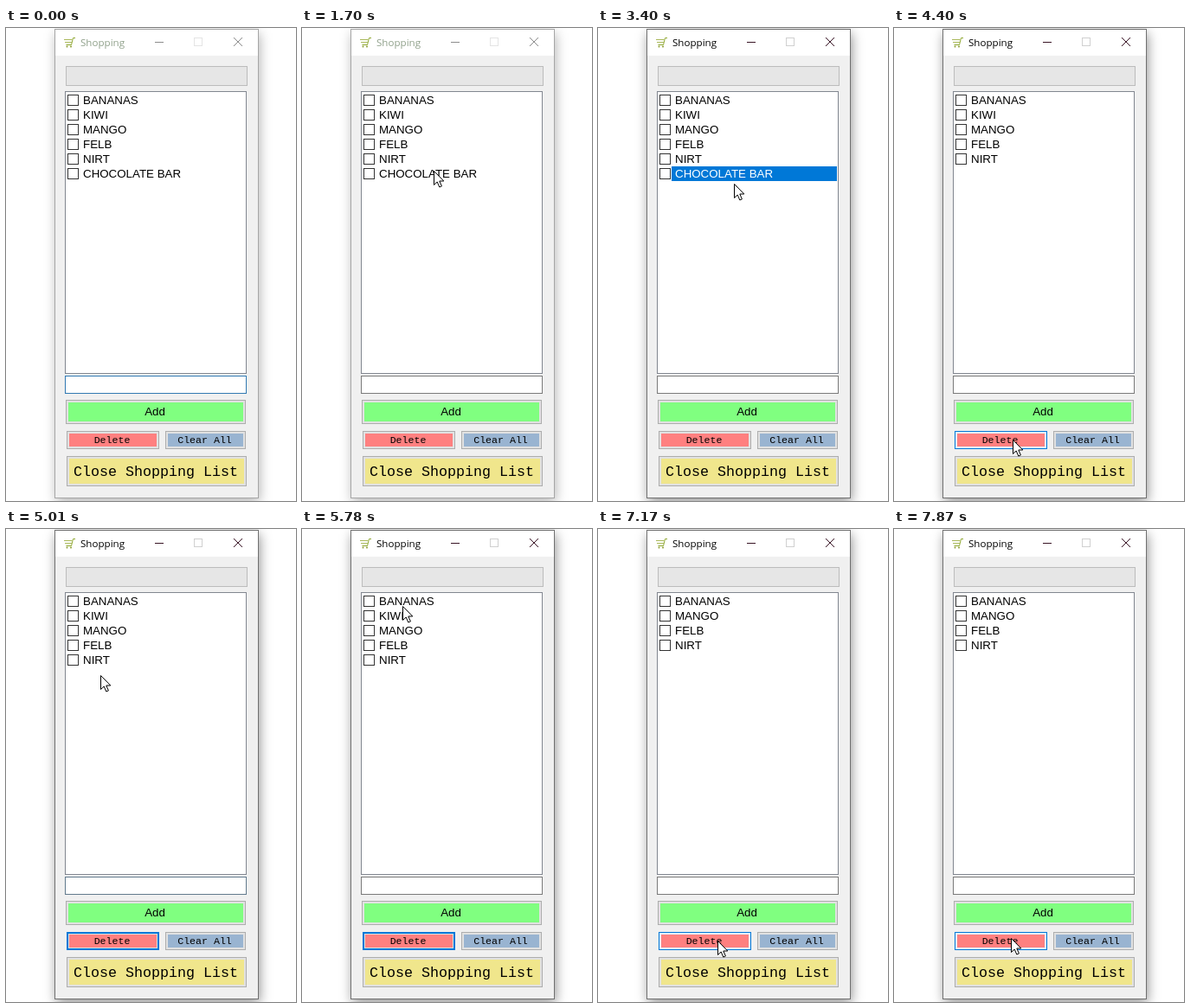
These frames come from a looping animation (335 px wide and 547 px high, 8 s). An HTML page:

```html
<!DOCTYPE html>
<html lang="en">
<head>
<meta charset="utf-8">
<title>Shopping</title>
<style>
  html, body { margin: 0; width: 100%; height: 100%; overflow: hidden; background: #fff; }
  svg { display: block; width: 100vw; height: 100vh; }
  text { white-space: pre; }
  .list { font: 13.33px "Liberation Sans", Arial, sans-serif; }
  .mono { font-family: "Liberation Mono", "Courier New", monospace; }
  .title { font: 11.6px "Open Sans", "Noto Sans", sans-serif; }
</style>
</head>
<body>
<svg id="stage" viewBox="0 0 335 547">
  <defs>
    <filter id="blur" x="-20%" y="-10%" width="140%" height="120%">
      <feGaussianBlur stdDeviation="7"/>
    </filter>
  </defs>
</svg>
<script>
const LOOP = 8000, STEP = 77.1, FADE = 5;
const BLUE = [0, 120, 215], GREY = [122, 122, 122];
const ITEMS = ["BANANAS", "KIWI", "MANGO", "FELB", "NIRT", "CHOCOLATE BAR"];

// Steps at which the user does something
const ACTIVATE = 42;
const REMOVALS = [
  { item: 5, select: 42, press: 55, gone: 56 },
  { item: 1, select: 82, press: 92, gone: 93 }
];

// Pointer moves, each easing out towards its end point
const START = { x: 148, y: 600 };
const MOVES = [
  { from: 10, to: 15, x: 152, y: 205 },  // in from below
  { from: 16, to: 18, x: 152, y: 159 },
  { from: 19, to: 22, x: 152, y: 165 },
  { from: 30, to: 36, x: 148, y: 404 },  // to the input and back
  { from: 36, to: 41, x: 153, y: 168 },
  { from: 42, to: 44, x: 157, y: 180 },
  { from: 44, to: 51, x: 137, y: 476 },  // to Delete
  { from: 59, to: 69, x: 104, y: 111 },  // up to the list
  { from: 70, to: 75, x: 116, y: 89 },
  { from: 81, to: 82, x: 118, y: 96 },
  { from: 83, to: 86, x: 119, y: 368 },  // to Delete again
  { from: 86, to: 90, x: 138, y: 476 },
  { from: 95, to: 98, x: 152, y: 480 },
  { from: 98, to: 100, x: 122, y: 469 },
  { from: 100, to: 102, x: 135, y: 473 }
];

const stage = document.getElementById("stage");

function set(el, attrs) {
  for (const key in attrs) el.setAttribute(key, attrs[key]);
}

function add(tag, attrs, content) {
  const el = document.createElementNS("http://www.w3.org/2000/svg", tag);
  set(el, attrs);
  if (content) el.textContent = content;
  return stage.appendChild(el);
}

function fillRect(x, y, width, height, fill) {
  return add("rect", { x, y, width, height, fill });
}

// One-pixel border drawn inside the given box
function frame(x, y, w, h, fill, stroke) {
  return add("rect", { x: x + .5, y: y + .5, width: w - 1, height: h - 1, fill, stroke });
}

function line(d, stroke) {
  return add("path", { d, stroke, fill: "none" });
}

function show(el, on) {
  set(el, { visibility: on ? "visible" : "hidden" });
}

function button(x, y, w, h, fill, label, size, cls) {
  const edge = frame(x, y, w, h, "#e1e1e1", "#adadad");
  const ring = add("rect", {
    x: x + 1, y: y + 1, width: w - 2, height: h - 2,
    fill: "none", stroke: "#0078d7", "stroke-width": 2
  });
  fillRect(x + 3, y + 3, w - 6, h - 6, fill);
  add("text", {
    x: x + w / 2 - 1, y: Math.round(y + h / 2 + size * .32), class: cls,
    "font-size": size, "text-anchor": "middle"
  }, label);
  return { x, y, w, h, edge, ring };
}

// Window
const shadow = add("rect", { x: 58, y: 6, width: 235, height: 542, filter: "url(#blur)" });
const border = frame(56, 1, 236, 543, "#f0f0f0", "#777");
fillRect(57, 2, 234, 30, "#fff");

// Cart icon
line("M80 11.5H77.5L75.5 19.5H69.5", "#8fa832");
line("M67 13.5H76.5M68 16.5H76", "#a9b85a");
for (const cx of [70.5, 75]) add("circle", { cx, cy: 21.5, r: 1, fill: "#8a9a2c" });

const title = add("text", { x: 86, y: 21, class: "title" }, "Shopping");
const minimise = line("M172 16.5H182");
const maximise = frame(217, 11, 10, 10, "none");
const cross = line("M263 11L273 21M273 11L263 21");

// Fields
frame(69, 44, 210, 23, "#e6e6e6", "#bcbcbc");
frame(68, 73, 210, 327, "#fff", "#828790");
const rows = ITEMS.map((_, i) => {
  const y = 75 + 17 * i;
  const bar = fillRect(85, y, 191, 17, "#0078d7");
  const box = frame(71, y + 2, 13, 13, "#fff", "#333");
  const label = add("text", { x: 89, y: y + 13, class: "list" });
  return { bar, box, label };
});
const input = frame(68, 402, 210, 21, "#fff");

const addBtn = button(69, 430, 208, 28, "#80ff80", "Add", 13.33, "list");
const delBtn = button(70, 466, 107, 21, "#ff8080", "Delete", 11.6, "mono");
const clearBtn = button(184, 466, 93, 21, "#99b4d1", "Clear All", 11.6, "mono");
const closeBtn = button(70, 495, 208, 35, "#f0e68c", "Close Shopping List", 16.67, "mono");
const buttons = [addBtn, delBtn, clearBtn, closeBtn];

const pointer = add("path", {
  d: "M.5 .5V16.5L4.2 13L6.8 19L9.4 17.9L6.8 12H11.8Z",
  fill: "#fff", stroke: "#000", "stroke-linejoin": "round"
});

function pointerAt(step) {
  let { x, y } = START;
  for (const m of MOVES) {
    if (step <= m.from) break;
    const t = Math.min(1, (step - m.from) / (m.to - m.from));
    const k = 1 - (1 - t) ** 2;
    x += (m.x - x) * k;
    y += (m.y - y) * k;
  }
  return { x: Math.round(x), y: Math.round(y) };
}

function crossesInput(step) {
  const a = pointerAt(step - 1).y, b = pointerAt(step).y;
  return Math.min(a, b) < 423 && Math.max(a, b) >= 402;
}

// The input's highlight fades for a few steps after the pointer leaves it
function inputGlow(step) {
  if (step === 0) return .6;
  for (let k = 0; k < FADE; k++) if (crossesInput(step - k)) return 1 - k / FADE;
  return 0;
}

function inside(p, b) {
  return p.x >= b.x && p.x < b.x + b.w && p.y >= b.y && p.y < b.y + b.h;
}

function drawWindow(active) {
  set(shadow, { "fill-opacity": active ? .44 : .3 });
  set(border, { stroke: active ? "#707070" : "#a6a6a6" });
  set(title, { fill: active ? "#000" : "#8fa08a" });
  set(minimise, { stroke: active ? "#3a1626" : "#8c8c8c" });
  set(maximise, { stroke: active ? "#d0d0d0" : "#e4e4e4" });
  set(cross, { stroke: active ? "#3a1626" : "#8c8c8c" });
}

function drawList(step) {
  const gone = REMOVALS.filter(r => step >= r.gone).map(r => r.item);
  const shown = ITEMS.filter((_, i) => !gone.includes(i));
  const current = REMOVALS.find(r => step >= r.select && step < r.gone);
  rows.forEach((row, i) => {
    const on = Boolean(current) && current.item === i;
    show(row.bar, on);
    show(row.box, i < shown.length);
    set(row.label, { fill: on ? "#fff" : "#000" });
    row.label.textContent = shown[i] || "";
  });
}

function drawControls(step, p) {
  const glow = inputGlow(step);
  const mix = GREY.map((c, i) => Math.round(c + (BLUE[i] - c) * glow));
  set(input, { stroke: `rgb(${mix})` });

  const [first, second] = REMOVALS;
  const focused = step >= first.press && step < second.select || step >= second.press;
  for (const b of buttons) {
    const hover = inside(p, b);
    set(b.edge, {
      stroke: hover ? "#0078d7" : "#adadad",
      fill: hover ? "#e5f1fb" : "#e1e1e1"
    });
    show(b.ring, b === delBtn && focused && !hover);
  }
}

function render(time) {
  const step = Math.floor((time % LOOP + 8) / STEP);
  const p = pointerAt(step);
  drawWindow(step >= ACTIVATE);
  drawList(step);
  drawControls(step, p);
  set(pointer, { transform: `translate(${p.x} ${p.y})` });
}

function tick() {
  render(performance.now());
  requestAnimationFrame(tick);
}
tick();
</script>
</body>
</html>
```
